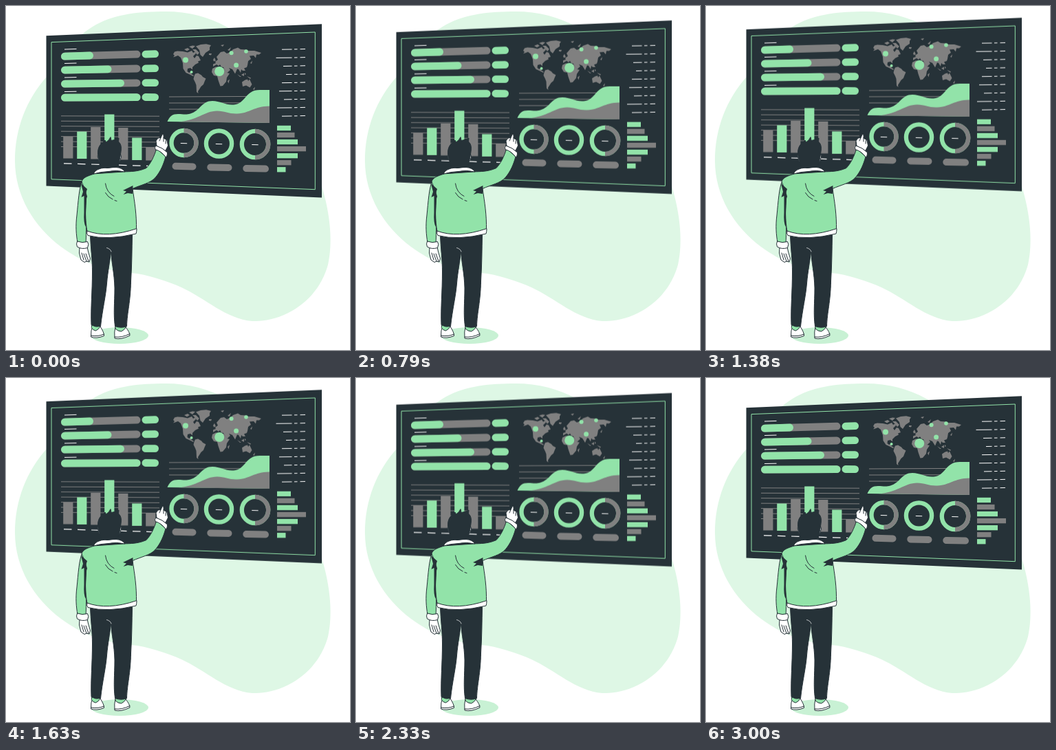
These frames come from a looping animation (500 px wide and 500 px high, 3040 ms). An HTML page:

```html
<!DOCTYPE html>
<html lang="en">
<head>
<meta charset="utf-8">
<title>Dashboard presentation</title>
<style>
  html, body { margin: 0; width: 100%; height: 100%; overflow: hidden; background: #fff; }
  svg { display: block; width: 100%; height: 100%; }
  #board { animation: float 3040ms linear infinite; }
  /* 1.5 s up, 1.5 s down, then a 40 ms rest */
  @keyframes float {
    49.34% { transform: translateY(-10px); }
    98.68%, 100% { transform: none; }
  }
  .green { fill: #92e3a9; }
  .grey { fill: #808080; }
  .dark { fill: #263238; }
  .ink { stroke: #263238; stroke-width: 1; stroke-linejoin: round; stroke-linecap: round; }
  .white { fill: #fff; }
  .line { fill: none; }
  .fold { fill: none; stroke: #fff; stroke-width: .7; }
</style>
</head>
<body>
<svg viewBox="0 0 500 500">
  <path fill="#def7e5" d="M13 225C13 178 30 135 60 102C82 68 104 42 131 27C161 11 195 8 232 8C265 8 295 16 320 30C380 60 440 180 459 262C472 305 475 345 468 376C459 409 436 435 404 449C385 457 372 458 358 458C320 455 290 425 255 409C235 400 205 390 182 388C140 384 110 372 80 350C40 320 13 275 13 225Z"/>
  <ellipse cx="165" cy="479" rx="42" ry="12" fill="#c8f1d4"/>

  <g id="board">
    <path class="dark" d="M58.5 43.2L459 26.2V278.5L58.5 261.4Z"/>
    <path class="line" stroke="#92e3a9" d="M66 52.6L449.3 38V266.7L66 251.8Z"/>
    <g id="meters"></g>
    <g id="columns"></g>
    <g id="map" class="grey">
      <path d="M243 70L245 66.5L249 65.5L257 66L264 67.5L270 65L272 68L275 66.5L276 69L272 73L274 76L277 72L280 73L283 79L279 80.5L280 82.5L275 85L271 89L271 92.5L268 90L264 91L263.5 95L266 97L269 95.5L269 98.5L273 101L272 102L266 99L261.5 97L257.5 91L257 83L254 75L250 72L246 73.5L243 74.5L245 72Z"/>
      <path d="M259 63L264 61L267 63L263 65.5ZM266 59L271 57.5L275 58L271 62ZM271 63L276 63L281 68L278 71L274 66Z"/>
      <path d="M276 58.5L283 56L291 55.2L298 57L296 60L296 64L290 68L286 74L282.500 71L281 64Z"/>
      <path d="M273.500 102L275 98.500L279 97.500L284 100.500L286 103L290.500 105.500L288.500 110L287 114L283.500 117L281 121L279 124L279.500 127L277 125L276.500 115L275 111L272.500 106Z"/>
      <path d="M295 69L299 69L298 71.500L295 71ZM301 78L303 75L305 79.500L302 80.500ZM312 57L317 56L315 59ZM322 64L327 60L325 65Z"/>
      <path d="M301 88L301 84.500L305 83L304 81L308 78L306 74L312 67L317 66L321 69L326 67L330 63L337 60.500L341 63L349 63.500L352 65L361 65L371 68L368 70.500L364 70.500L363 75.500L360 72L354 72.500L356 77L352 80L351 86L350 89L346 90.500L348 94L344 94L342 92L341 97L338 92L336 91.500L333 98.500L329 92L324 90L326 93L321 97.500L316 89L313 88.500L311 85L309 87L306 85Z"/>
      <path d="M300 91L305 88.500L311 89L317 90.500L321 97L325 98L321 104L320 110L315 116L311.500 116.500L308.500 108L307 102L302 101L299 96Z"/>
      <path d="M322 109L325 106.500L323.500 112.500ZM336 99L342 103L340 103ZM342 100L346 97.500L346 102ZM350 102L356 104.500L355 106ZM355 83L358 79.500L357 84ZM359 121L362 117.500L361 122ZM347 97L349 99L347 100Z"/>
      <path d="M343 110.500L347.500 107.500L351 106.500L352 109L354 106.500L357.500 114L354.500 118.500L349 115.500L344 117Z"/>
    </g>
    <g id="dots" class="green"></g>
    <g id="waves">
      <path stroke="#808080" class="line" d="M237 132L383 131.300M237 141L383 140.700M237 150L383 150"/>
      <path class="green" d="M234.500 168C238 160 242 157 250 157C257 157 261 158.500 268 156.500C283 152 284 138 300 138C312 138 319 144.500 331 143.500C349 142 347 122 369 122H383V170Z"/>
      <path class="grey" d="M250 168.300C278 167 288 152.500 307 152.500C318 152.500 324 157 336 156.500C355 155.500 360 146 383 145.500V170Z"/>
    </g>
    <g id="rings"></g>
    <g id="rows"></g>
  </g>

  <g id="man" class="ink">
    <path class="white" d="M126 465Q123 471 123.500 481Q131 484 142.500 479.500Q143 475 137 466Z"/>
    <path class="green" d="M125 463.500L137 465.500Q135 470 130.500 472Q126.500 471.500 124.500 468Z"/>
    <path class="line" d="M123.500 479Q133 481 142.500 477"/>
    <path class="white" d="M159 467Q157 473 158 483Q167 485.500 180 479Q180 474 174 467Z"/>
    <path class="green" d="M159 465.500L175 466Q172 471 167.500 473Q162 472.500 159.500 469.500Z"/>
    <path class="line" d="M158 481Q168 482.500 180 476.500"/>
    <path class="dark" d="M122.500 332C123 352 125.500 368 125.500 386C125.500 416 123 438 124 463.500Q130 467.500 137.500 465.500C140 442 145 422 146.500 403C148 385 151 373 152.500 356C153.500 374 157.500 388 158 410C158 432 156 447 158.500 465.500Q168 469 175.500 465.500C176 445 181 430 181.500 400C183 375 183 355 183.500 331Z"/>
    <path class="fold" d="M146.500 351.500Q152 353 153 357"/>

    <path class="white" d="M107 350L106.500 359L109 369L114 372.500L117 371L121 372L122.500 367L119.500 357L118 350Z"/>
    <path class="line" d="M110 359L113 369M113 360L117 371M116 360L120 371"/>
    <path class="green" d="M111 254C106 264 105 285 103 304C101 320 102 332 104 344L116 346C117 328 116 310 118 282Z"/>
    <path class="white" d="M103.500 342Q111 345 118.500 342.500Q121 346 118.500 351.500Q110 354 103.500 350Q101.500 346 103.500 342Z"/>

    <path class="white" d="M219 203L218 196L221 192L225 191.500L227.500 186Q229.500 186 229 192L234 195L235.500 203L232 210Z"/>
    <path class="line" d="M225 191.500L223 196M229 192L229 197M232.500 195L232 200"/>
    <path class="green" d="M128 244C119 247 112 249 110 255C112 262 116 266 117 276C115 294 115 311 118 328Q147 341 189.500 326C190 303 187 286 184 265.500C196 260 210 257.500 217 249.500C225 240 229 230 232 219L219 207C215 219 211 228 204 235.500C192 241 181 240.500 171 241Z"/>
    <path class="white" d="M118 327Q147 338 190 323.500Q190 328 189 331Q148 341 119 333.500Q117 331 118 327Z"/>
    <path class="white" d="M218 203Q228 206 234.500 213Q235 217 232.500 220Q226 211 217 208.500Q215.500 205 218 203Z"/>
    <path class="white" d="M127 244Q130 236 145 235L160 234.500Q169 235 173 241Q160 238 149 240.500Q137 241 127 244Z"/>
    <path class="dark" stroke="none" d="M109 258L118 266L116 272L118 277L117 279Q115.500 300 116 321Q112.500 316 113.500 300L113.500 276L109.500 278L112 270ZM184.500 261L170 268L175 269.500L170.500 274L177 272L184 273Z"/>
    <path class="line" d="M144.500 258Q146 271 157 276.500M144.500 271.500Q148 278 155 281M158 282.500L161 283.500"/>
    <path class="white" d="M137 216Q132 215 133.500 220Q135 226 138 227ZM164 216Q168 214 167.500 220Q166 226 163 227Z"/>
    <path class="dark" d="M136 225C131 213 134 203 140 199L144 195L145.500 198Q150 195 152 190.500L153 195.500Q159 195 164 192L163.500 197Q169 202 167 212Q166 222 164 227Q162 235 155 234.500Q147 237 139 234Z"/>
  </g>
</svg>
<script>
  const GREEN = '#92e3a9', GREY = '#808080', WHITE = '#fff';

  function add(id, tag, attrs) {
    const el = document.createElementNS('http://www.w3.org/2000/svg', tag);
    for (const key in attrs) el.setAttribute(key, attrs[key]);
    document.getElementById(id).append(el);
  }

  function stroke(id, x1, y1, x2, y2, color, width = 1, cap = 'butt') {
    add(id, 'line', { x1, y1, x2, y2, stroke: color, 'stroke-width': width, 'stroke-linecap': cap });
  }

  // Rounded bar whose caps lie inside x1..x2.
  function pill(id, x1, y1, x2, y2, color, width = 10.8) {
    stroke(id, x1 + width / 2, y1, x2 - width / 2, y2, color, width, 'round');
  }

  [127, 153.5, 172, 195.5].forEach((end, i) => {
    const left = 73.2 + i * 20, right = 70.2 + i * 20.8;
    const y = left + (right - left) * (end - 80) / 115.5;
    pill('meters', 80, left, 195.5, right, GREY);
    pill('meters', 80, left, end, y, GREEN);
    pill('meters', 197.5, right - .1, 222, right - .5 + i * .15, GREEN);
    stroke('meters', 85, 63 + i * 20.5, 102.5, 62.4 + i * 20.6, WHITE);
  });

  for (let i = 0; i < 7; i++) {
    stroke('columns', 80, 159.8 + i * 7.45, 223, 160.2 + i * 7.55, GREY);
  }
  [190, 182.5, 176, 157.5, 177, 191.5, 205].forEach((top, i) => {
    const x = 83.2 + i * 20, bottom = 221.5 + i * .5;
    add('columns', 'rect', { x, y: top, width: 14.2, height: bottom - top, fill: i % 2 ? GREEN : GREY });
    stroke('columns', x + .8, 228.8 + i * .6, x + 12.3, 229.2 + i * .6, WHITE, 1.2);
  });

  [[261, 78.6, 4], [269.6, 96, 2], [310.2, 95, 7], [327.6, 68.3, 3], [349, 66, 2.8], [334.6, 86, 3.5]]
    .forEach(([cx, cy, r]) => add('dots', 'circle', { cx, cy, r }));

  [[258.5, 199, 18, 241.5, 276.5], [309.5, 200, 18.6, 292.3, 328.5], [362, 201, 19.2, 344.3, 382]]
    .forEach(([x, y, r, left, right], i) => {
      add('rings', 'circle', { cx: x, cy: y, r, fill: 'none', stroke: GREEN, 'stroke-width': 6.3 });
      if (i !== 1) {
        add('rings', 'path', {
          d: `M${x} ${y - r}A${r} ${r} 0 0 1 ${x} ${y + r}`,
          fill: 'none', stroke: GREY, 'stroke-width': 6.3
        });
      }
      stroke('rings', x - 4.7, y + .5, x + 4.7, y + .8, WHITE, 1.1);
      pill('rings', left, 232.8 + i * 1.6, right, 233.4 + i * 1.6, GREY, 10);
    });

  [401, 392.5, 403, 407, 401, 397, 404, 394, 401].forEach((x, i) => {
    const y = 63 + i * 12.12;
    stroke('rows', x, y + .2, 415.5, y, WHITE);
    stroke('rows', 419, y - .1, 423.5, y - .2, WHITE);
    stroke('rows', 427.5, y - .3, 435, y - .5, WHITE);
  });

  [414, 419.5, 424, 436, 424, 414.5, 406.5].forEach((end, i) => {
    add('rows', 'rect', { x: 394, y: 173.8 + i * 10.05, width: end - 394, height: 7.3, fill: i % 2 ? GREY : GREEN });
  });
</script>
</body>
</html>
```
